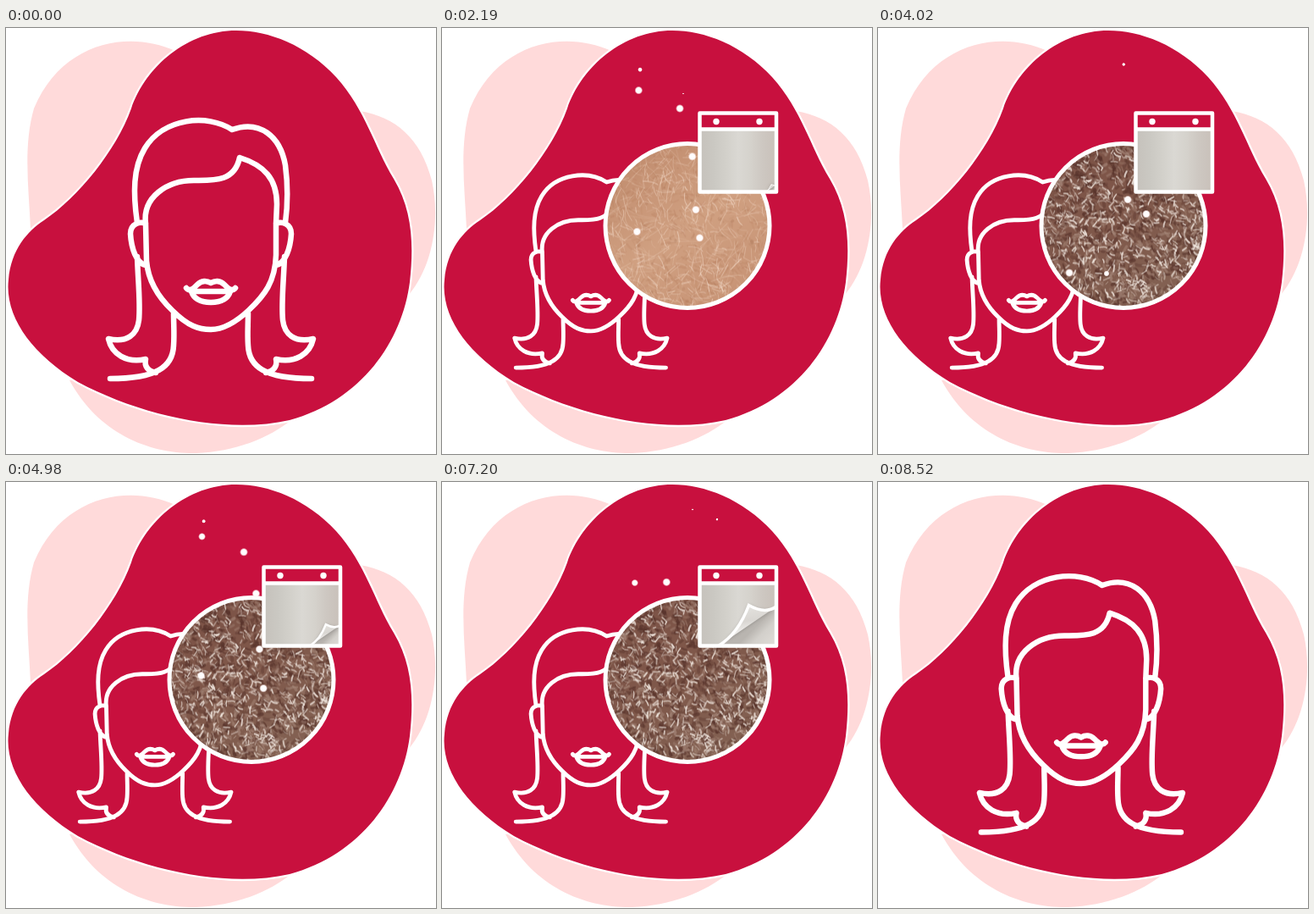
Recreate the animation shown at these times as an HTML page with a canvas. Size 508 by 503 pixels, loop 8.55 s.

```html
<!DOCTYPE html>
<html lang="en">
<head>
<meta charset="utf-8">
<title>Skin losing moisture</title>
<style>
html, body { margin: 0; width: 100%; height: 100%; overflow: hidden; background: #fff; }
canvas { display: block; }
</style>
</head>
<body>
<canvas id="stage" width="508" height="503"></canvas>
<script>
const LOOP = 8550, RED = '#c8103e', WHITE = '#fff', TAU = Math.PI * 2;
const ZOOM = 1.342, SHIFT_X = 6, SHIFT_Y = -124.3;
const ctx = document.getElementById('stage').getContext('2d');
const clamp = v => Math.max(0, Math.min(1, v));
const ramp = (t, a, b) => clamp((t - a) / (b - a));
const mix = (a, b, k) => a + (b - a) * k;
const ease = u => u < .5 ? 4 * u ** 3 : 1 - 4 * (1 - u) ** 3;

// Background shapes
const blob = new Path2D('M272 3C310 3 355 20 390 58C425 97 435 140 458 178C480 215 482 255 477 300C468 370 420 440 335 463C260 480 160 458 85 418C30 385-2 340 3 297C6 262 25 240 45 227C85 200 130 145 148 95C165 45 215 3 272 3Z');
const petals = new Path2D('M200 27C145 2 66 16 33 95C20 140 27 190 29 237L200 237Z M75 416C110 480 170 503 225 502C270 500 310 485 338 462L240 400Z M418 98C460 105 490 130 503 180C513 225 505 280 476 315L380 250Z');

// Portrait: one half is mirrored, hair and lips are drawn whole
const half = new Path2D('M165 231C158 228 147 231 147 243C148 260 154 278 165 280M155 270C156 300 159 325 157 345C155 362 143 372 121 367C125 385 142 396 165 391C163 400 168 405 177 407M198 337C198 350 199 362 198 375C197 400 178 414 123 414');
const woman = new Path2D('M155 230C150 195 150 165 164 142C186 106 238 101 267 120C300 108 324 128 330 162C333 185 333 208 330 230M165 231C161 200 190 180 222 180C245 180 270 182 276 153C305 162 320 178 320 208L319 231L319 268C318 300 305 316 287 333C270 349 256 356 242 356C228 356 215 352 197 334C180 318 168 300 166 275L165 231M213 307C217 312 222 307 226 303C231 298 237 298 242 301C247 298 253 298 258 303C262 307 267 312 271 307M219 311L265 311M219 311C222 320 230 324 242 324C254 324 262 320 265 311');
woman.addPath(half);
woman.addPath(half, new DOMMatrix([-1, 0, 0, 1, 484, 0]));

// Skin textures; a layer is count, length, width, colour, opacity
function makeSkin(seed, stops, layers) {
  const c = document.createElement('canvas');
  c.width = c.height = 200;
  const g = c.getContext('2d');
  const rnd = () => (seed = seed * 16807 % 2147483647) / 2147483647;
  const base = g.createLinearGradient(30, 0, 170, 200);
  stops.forEach((s, i) => base.addColorStop(i / (stops.length - 1), s));
  g.fillStyle = base;
  g.fillRect(0, 0, 200, 200);
  g.lineCap = 'round';
  for (const [count, length, width, color, alpha] of layers) {
    g.strokeStyle = color;
    for (let i = 0; i < count; i++) {
      const x = rnd() * 200, y = rnd() * 200, d = length * (.4 + rnd());
      const a = (rnd() < .6 ? .7 : 2.2) + (rnd() - .5) * 1.5;
      const dx = Math.cos(a) * d, dy = Math.sin(a) * d, bend = (rnd() - .5) * d;
      g.globalAlpha = alpha * (.4 + rnd() * .6);
      g.lineWidth = width * (.5 + rnd());
      g.beginPath();
      g.moveTo(x, y);
      g.quadraticCurveTo(x + dx / 2 - bend * .5, y + dy / 2 + bend * .5, x + dx, y + dy);
      g.stroke();
    }
  }
  return c;
}
const softSkin = makeSkin(71, ['#bf8a6c', '#d0a081', '#c69274'], [
  [400, 9, 2, '#b57c5c', .3], [60, 1, 3, '#a06a4c', .3],
  [650, 13, .7, '#f4dccb', .7], [130, 30, .6, '#f3d9c6', .6]
]);
const drySkin = makeSkin(29, ['#7c5246', '#80594b', '#846455'], [
  [900, 6, 3.4, '#57332b', .65], [700, 6, 2.4, '#a98b7d', .6], [1000, 6, 1.4, '#f0e6de', .9]
]);

function circle(x, y, r, fill) {
  ctx.beginPath();
  ctx.arc(x, y, r, 0, TAU);
  ctx.fillStyle = fill;
  ctx.fill();
}

function drawSkin(t, alpha) {
  ctx.save();
  ctx.beginPath();
  ctx.arc(290, 233.5, 97, 0, TAU);
  ctx.clip();
  ctx.globalAlpha = alpha;
  ctx.drawImage(softSkin, 190, 133.5);
  ctx.globalAlpha = alpha * ramp(t, 2640, 3800);
  ctx.drawImage(drySkin, 190, 133.5);
  ctx.restore();
}

// Rising droplets: start phase, x from, x to, y from, y to
const CYCLE = 1384, RISE = 700;
const drops = [
  [152, 279, 285, 282, 77], [250, 263, 233, 252, 42], [354, 248, 229, 250, 36],
  [435, 281, 281, 188, 30], [470, 297, 294, 250, 30], [496, 302, 296, 290, 75],
  [554, 230, 232, 282, 62], [659, 305, 290, 256, 40], [61, 242, 240, 230, 40],
  [-63, 279, 279, 270, 60], [-86, 279, 279, 260, 55], [-156, 270, 264, 290, 72],
  [-205, 226, 228, 290, 97], [-338, 316, 325, 240, 43], [-359, 295, 296, 230, 32]
];
function drawDrops(t) {
  for (const [start, x0, x1, y0, y1] of drops) {
    const age = ((t - start) % CYCLE + CYCLE) % CYCLE, born = t - age;
    if (age > RISE || born < 880 || born > 6775) continue;
    const u = age / RISE, e = ease(u);
    const r = 5 * Math.min(1, u * 20, (1 - u) / .36);
    if (r < .1) continue;
    const x = mix(x0, x1, e), y = mix(y0, y1, e);
    const glow = ctx.createRadialGradient(x, y, 0, x, y, r);
    glow.addColorStop(0, WHITE);
    glow.addColorStop(.65, '#fffafa');
    glow.addColorStop(1, '#ffe8e800');
    circle(x, y, r, glow);
  }
}

// How far the page corner is peeled, in pixels along the bottom edge
function peel(t) {
  const q = (t + 160) % 2050;
  if (q > 1440) return 0;
  return (12 * clamp(q / 250) + 24 * Math.exp((q - 1040) * .005)) * ramp(t, 870, 1120);
}

function drawCurl(a) {
  const b = a * .68, X = 395, Y = 193.5;
  const tx = X - .7 * b, ty = Y - .7 * a;
  ctx.save();
  ctx.beginPath();
  ctx.rect(305, 121, 93, 74);
  ctx.clip();
  // page below, shaded near the fold
  const shade = ctx.createLinearGradient(X - a * .35, Y - b * .5, X - a * .05, Y - b * .06);
  shade.addColorStop(0, '#b9b5b0');
  shade.addColorStop(.4, '#d3d0cb');
  shade.addColorStop(1, '#dedbd7');
  ctx.fillStyle = shade;
  ctx.beginPath();
  ctx.moveTo(X - a, Y);
  ctx.lineTo(X, Y - b);
  ctx.lineTo(X, Y);
  ctx.fill();
  // turned corner
  const flap = ctx.createLinearGradient(tx, ty, X - a * .4, Y - b * .4);
  flap.addColorStop(0, '#e4e2de');
  flap.addColorStop(.6, '#d9d6d2');
  flap.addColorStop(1, '#efedeb');
  ctx.fillStyle = flap;
  ctx.strokeStyle = WHITE;
  ctx.lineWidth = Math.min(3.5, a * .07);
  ctx.shadowColor = '#0004';
  ctx.shadowBlur = 4;
  ctx.beginPath();
  ctx.moveTo(X - a, Y);
  ctx.quadraticCurveTo(mix(X - a, tx, .65), mix(Y, ty, .3), tx, ty);
  ctx.quadraticCurveTo(mix(tx, X, .6), Y - b + a * .14, X, Y - b);
  ctx.fill();
  ctx.shadowBlur = 0;
  ctx.stroke();
  ctx.restore();
}

const paper = ctx.createLinearGradient(306, 0, 394, 0);
['#c6c2bc', '#cac8c2', '#d2d0ca', '#dad8d3', '#d5d2cc', '#cdc7c1', '#c9c1ba']
  .forEach((c, i) => paper.addColorStop(i / 6, c));

function drawCalendar(t, alpha) {
  ctx.save();
  ctx.globalAlpha = alpha;
  ctx.fillStyle = RED;
  ctx.fillRect(305, 101, 90, 19);
  ctx.fillStyle = paper;
  ctx.fillRect(305, 120, 90, 73.5);
  const a = peel(t);
  if (a > 1) drawCurl(a);
  ctx.strokeStyle = WHITE;
  ctx.lineWidth = 4.5;
  ctx.lineJoin = 'round';
  ctx.beginPath();
  ctx.rect(304.5, 100.5, 90.5, 93);
  ctx.moveTo(304.5, 119.5);
  ctx.lineTo(395, 119.5);
  ctx.stroke();
  circle(324, 110.5, 3.7, WHITE);
  circle(375, 110.5, 3.7, WHITE);
  ctx.restore();
}

function draw(now) {
  const t = now % LOOP;
  ctx.fillStyle = WHITE;
  ctx.fillRect(0, 0, 508, 503);
  ctx.fillStyle = '#ffdada';
  ctx.fill(petals);
  ctx.strokeStyle = WHITE;
  ctx.lineWidth = 4.5;
  ctx.stroke(blob);
  ctx.fillStyle = RED;
  ctx.fill(blob);

  // camera: 1 = close on the portrait, 0 = whole scene
  const near = 1 - ease(ramp(t, 0, 900)) + ease(ramp(t, 7800, 8700));
  const zoom = mix(1, ZOOM, near);
  ctx.save();
  ctx.transform(zoom, 0, 0, zoom, SHIFT_X * near, SHIFT_Y * near);

  ctx.save();
  ctx.scale(1 / ZOOM, 1 / ZOOM);
  ctx.translate(-SHIFT_X, -SHIFT_Y);
  ctx.strokeStyle = WHITE;
  ctx.lineWidth = 6.5;
  ctx.lineCap = ctx.lineJoin = 'round';
  ctx.stroke(woman);
  ctx.restore();

  const out = 1 - ramp(t, 7740, 7980);
  const skin = ramp(t, 440, 680) * out;
  if (skin > 0) {
    drawSkin(t, skin);
    ctx.globalAlpha = skin;
    ctx.strokeStyle = WHITE;
    ctx.lineWidth = 5;
    ctx.beginPath();
    ctx.arc(290, 233.5, 97, 0, TAU);
    ctx.stroke();
    ctx.globalAlpha = 1;
    drawDrops(t);
    drawCalendar(t, ramp(t, 540, 780) * out);
  }
  ctx.restore();
}

const begin = performance.now();
function tick() {
  draw(performance.now() - begin);
  requestAnimationFrame(tick);
}
tick();
</script>
</body>
</html>
```
